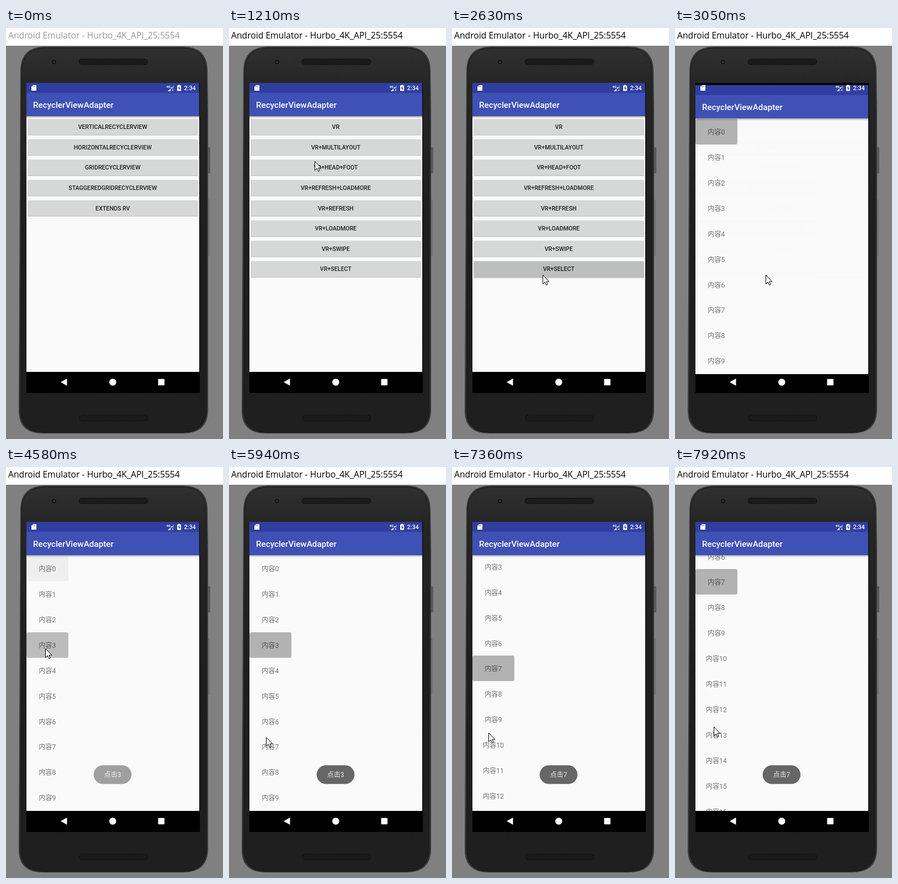
Recreate the animation shown at these times as an HTML page. Size 393x741 px, loop 7.99 s.

```html
<!DOCTYPE html>
<html lang="en">
<head>
<meta charset="utf-8">
<title>RecyclerViewAdapter</title>
<style>
html, body { margin: 0; width: 100%; height: 100%; overflow: hidden; background: #808080; }
svg { display: block; width: 393px; height: 741px; }
text { font-family: Roboto, "Noto Sans CJK SC", "Noto Sans CJK JP", "Noto Sans CJK", sans-serif; white-space: pre; }
.title { font: 15.7px "Open Sans", "Noto Sans", sans-serif; }
.bar { font-size: 15.24px; font-weight: 500; fill: #fff; }
.btn { font-size: 10.67px; font-weight: 500; fill: #1f1f1f; text-anchor: middle; }
.item { font-size: 12.2px; fill: #000; fill-opacity: .54; text-anchor: middle; }
.toast { font-size: 12px; fill: #eee; text-anchor: middle; }
</style>
</head>
<body>
<svg id="stage" viewBox="0 0 393 741">
  <defs>
    <linearGradient id="body" x1="0" y1="0" x2="0" y2="1">
      <stop offset="0" stop-color="#303030"/>
      <stop offset=".09" stop-color="#262626"/>
      <stop offset=".5" stop-color="#1e1e1e"/>
      <stop offset="1" stop-color="#1f1f1f"/>
    </linearGradient>
    <linearGradient id="shade" x1="0" y1="0" x2="0" y2="1">
      <stop offset="0" stop-color="#000" stop-opacity=".3"/>
      <stop offset="1" stop-color="#000" stop-opacity="0"/>
    </linearGradient>
    <pattern id="mesh" width="4" height="4" patternUnits="userSpaceOnUse">
      <rect width="4" height="4" fill="#141414"/>
      <circle cx="1" cy="1" r=".8" fill="#303030"/>
      <circle cx="3" cy="3" r=".8" fill="#303030"/>
    </pattern>
    <clipPath id="screen"><rect x="37" y="99" width="313" height="559"/></clipPath>
    <clipPath id="page"><rect x="37" y="159" width="313" height="461"/></clipPath>
  </defs>

  <rect width="393" height="32" fill="#fff"/>
  <text id="title" class="title" x="4" y="19.3">Android Emulator - Hurbo_4K_API_25:5554</text>

  <rect x="365" y="215" width="5" height="47" rx="1.5" fill="#5a5a5a"/>
  <rect x="365" y="309" width="4" height="102" rx="1.5" fill="#727272"/>
  <path d="M26 76Q27 34 70 33.500H322Q364 34 365 76L366 150V690Q365 731 321 731H67Q23 731 23 690Z" fill="#383838"/>
  <path d="M28.500 77Q29 37 71 36H321Q361 37 362 77L363 150V689Q362 729 320 729H68Q26 729 26 689Z" fill="url(#body)" stroke="#151515"/>
  <circle cx="87" cy="61.500" r="4.500" fill="#171717" stroke="#333" stroke-width=".7"/>
  <circle cx="87" cy="61.500" r="1.700" fill="#34363c"/>
  <rect x="132" y="56" width="125" height="10" rx="5" fill="url(#mesh)" stroke="#111"/>
  <rect x="133" y="698" width="124" height="10" rx="5" fill="url(#mesh)" stroke="#111"/>

  <rect x="37" y="99" width="314" height="559" fill="#000"/>
  <g id="panels" clip-path="url(#screen)"></g>

  <g fill="#fff">
    <path d="M49 103H55V113H46V106Z"/>
    <path d="M48.500 104.500v2m2-2v2m2-2v2" stroke="#303f9f" stroke-width=".8"/>
    <text x="290.500" y="107.500" font-size="6" font-weight="700">4G</text>
    <path d="M293 114L301 106V109H298V114Z"/>
    <path d="M301 106L304 103V109H301Z" opacity=".35"/>
    <path d="M300.300 110.500l3 3m0-3l-3 3" stroke="#fff" stroke-width=".9"/>
    <path d="M310 103.500H312V102.500H315V103.500H317V113.500H310Z"/>
    <path d="M314 104.500L311.500 109H313.200V112.500L315.700 108H314Z" fill="#303f9f"/>
    <text x="322.500" y="112" font-size="10.670" font-weight="500">2:34</text>
    <path d="M99 638.500L110.500 632V645Z"/>
    <circle cx="193.300" cy="638.500" r="6.300"/>
    <rect x="275.500" y="632.800" width="11.500" height="11.500" rx="1"/>
  </g>

  <g id="toast" opacity="0">
    <rect x="158.700" y="537.700" width="68.600" height="33.800" rx="16.900" fill="#666"/>
    <text id="toastText" class="toast" x="193" y="559"></text>
  </g>
  <path id="cursor" d="M.5 .5V16.500L4.300 13L6.800 18.600L9.200 17.500L6.800 12.200H11.800Z" fill="#fff" stroke="#000" stroke-width="1"/>
</svg>
<script>
const LOOP = 7990, TICK = 70, ROW = 45.95;
const NS = "http://www.w3.org/2000/svg";
const $ = id => document.getElementById(id);

const ANCHORS = [120, 850, 1560, 2140, 3340, 4020, 5940, 6450];

// time, x, y, sideways bow on the way there
const POINTER = [
  [120, 155, 181, 0], [1060, 155, 181, 0], [1490, 157, 426, 0], [1560, 157, 426, 0],
  [1700, 157, 461, 0], [1910, 164, 445, 0], [3270, 164, 445, 0], [4020, 71, 327, 0],
  [4860, 71, 327, 0], [5560, 67, 487, -9], [7080, 67, 487, 0], [7360, 66, 479, 0], [7920, 70, 468, 0]
];
const SCROLL = [[6380, 0], [6520, 36], [6660, 62], [6800, 74], [7080, 74], [7360, 141], [7920, 297]];

const clamp = v => Math.min(1, Math.max(0, v));
const span = (t, start, ms) => clamp((t - start) / ms);
const smooth = p => (1 - Math.cos(Math.PI * p)) / 2;

function add(parent, tag, attrs, text) {
  const el = document.createElementNS(NS, tag);
  for (const k in attrs) el.setAttribute(k, attrs[k]);
  if (text !== undefined) el.textContent = text;
  return parent.appendChild(el);
}
const set = (el, name, v) => el.setAttribute(name, v);

function track(keys, t, ease) {
  let i = 1;
  while (i < keys.length - 1 && t > keys[i][0]) i++;
  const a = keys[i - 1], b = keys[i];
  const p = ease(span(t, a[0], b[0] - a[0]));
  return { p, key: b, at: n => a[n] + (b[n] - a[n]) * p };
}

// The black strip above the status bar shows while a panel is still rising
function makePanel() {
  const g = add($("panels"), "g", {});
  const box = (y, height, fill) => add(g, "rect", { x: 37, y, width: 313, height, fill });
  box(49, 50, "#000");
  box(99, 18, "#303f9f");
  box(159, 461, "#fafafa");
  const page = add(add(g, "g", { "clip-path": "url(#page)" }), "g", {});
  box(117, 42, "#3f51b5");
  box(159, 4, "url(#shade)");
  add(g, "text", { class: "bar", x: 49, y: 144.4 }, "RecyclerViewAdapter");
  return { g, page };
}

function makeButtons(panel, labels, pressed) {
  let press;
  labels.forEach((label, i) => {
    const y = 164 + 36.6 * i;
    const box = { x: 39.7, y, width: 307.6, height: 28.3, rx: 1.5 };
    const lift = add(panel.page, "rect", { ...box, y: y + 2.5, x: 39, width: 309, height: 29, fill: "#000", opacity: 0 });
    add(panel.page, "rect", { ...box, x: 39.2, width: 308.6, y: y + .9, height: 28.8, fill: "#000", opacity: .2 });
    add(panel.page, "rect", { ...box, fill: "#d6d7d7" });
    if (i === pressed) {
      const id = "press" + labels.length;
      add(add(panel.page, "clipPath", { id }), "rect", box);
      const ink = add(panel.page, "g", { "clip-path": `url(#${id})` });
      const tint = add(ink, "rect", { ...box, fill: "#000" });
      press = { lift, tint, wave: add(ink, "circle", { fill: "#000" }) };
    }
    add(panel.page, "text", { class: "btn", x: 193.3, y: y + 18.2 }, label);
  });
  return press;
}

const home = makePanel(), menu = makePanel(), list = makePanel();
const homePress = makeButtons(home, ["VERTICALRECYCLERVIEW", "HORIZONTALRECYCLERVIEW",
  "GRIDRECYCLERVIEW", "STAGGEREDGRIDRECYCLERVIEW", "EXTENDS RV"], 0);
const menuPress = makeButtons(menu, ["VR", "VR+MULTILAYOUT", "VR+HEAD+FOOT", "VR+REFRESH+LOADMORE",
  "VR+REFRESH", "VR+LOADMORE", "VR+SWIPE", "VR+SELECT"], 7);

const marks = Array.from({ length: 18 }, (_, i) => {
  const y = Math.round(159.8 + ROW * i);
  const mark = add(list.page, "rect", { x: 37, y, width: 76, height: 46, rx: 3.5, fill: "#000" });
  add(list.page, "text", { class: "item", x: 74.8, y: y + 27.5 }, "内容" + i);
  return mark;
});

function snap(t) {
  if (t < ANCHORS[0]) return 0;
  const a = ANCHORS.filter(v => v <= t).pop();
  return a + Math.floor((t - a) / TICK) * TICK;
}

// New screen fades in while rising into place
function enter(panel, t, start) {
  const alpha = 1 - (1 - span(t, start, 200)) ** 4;
  const dy = Math.round(45 * (1 - span(t, start, 350)) ** 5);
  set(panel.g, "opacity", alpha);
  set(panel.g, "transform", `translate(0 ${dy})`);
}

function ripple(press, t, start, x, y) {
  const grow = span(t, start, 600), fade = 1 - span(t, start + 420, 400);
  set(press.wave, "cx", x);
  set(press.wave, "cy", y);
  set(press.wave, "r", grow * 220);
  set(press.wave, "opacity", .09 * fade);
  set(press.tint, "opacity", .08 * span(t, start, 200) * fade);
  set(press.lift, "opacity", .14 * span(t, start, 150) * fade);
}

function draw(time) {
  const t = snap(time);
  set($("title"), "fill", t < 120 ? "#999" : "#000");

  ripple(homePress, t, 80, 155, 181);
  enter(menu, t, 860);
  ripple(menuPress, t, 2090, 164, 445);
  enter(list, t, 2918);

  const toThree = smooth(span(t, 4392, 250)), toSeven = smooth(span(t, 5935, 250));
  const shown = { 0: 1 - toThree, 3: toThree * (1 - toSeven), 7: toSeven };
  marks.forEach((m, i) => set(m, "opacity", .29 * (shown[i] || 0)));
  const scroll = Math.round(track(SCROLL, t, p => p).at(1));
  set(list.page, "transform", `translate(0 ${-scroll})`);

  set($("toast"), "opacity", 1 - (1 - span(t, 4430, 400)) ** 2);
  $("toastText").textContent = t < 6450 ? "点击3" : "点击7";

  const c = track(POINTER, t, smooth);
  const x = Math.round(c.at(1) + c.key[3] * Math.sin(Math.PI * c.p));
  set($("cursor"), "transform", `translate(${x} ${Math.round(c.at(2))})`);
  set($("cursor"), "visibility", t < 120 ? "hidden" : "visible");
}

const begin = performance.now();
function loop() {
  draw((performance.now() - begin) % LOOP);
  requestAnimationFrame(loop);
}
loop();
</script>
</body>
</html>
```
